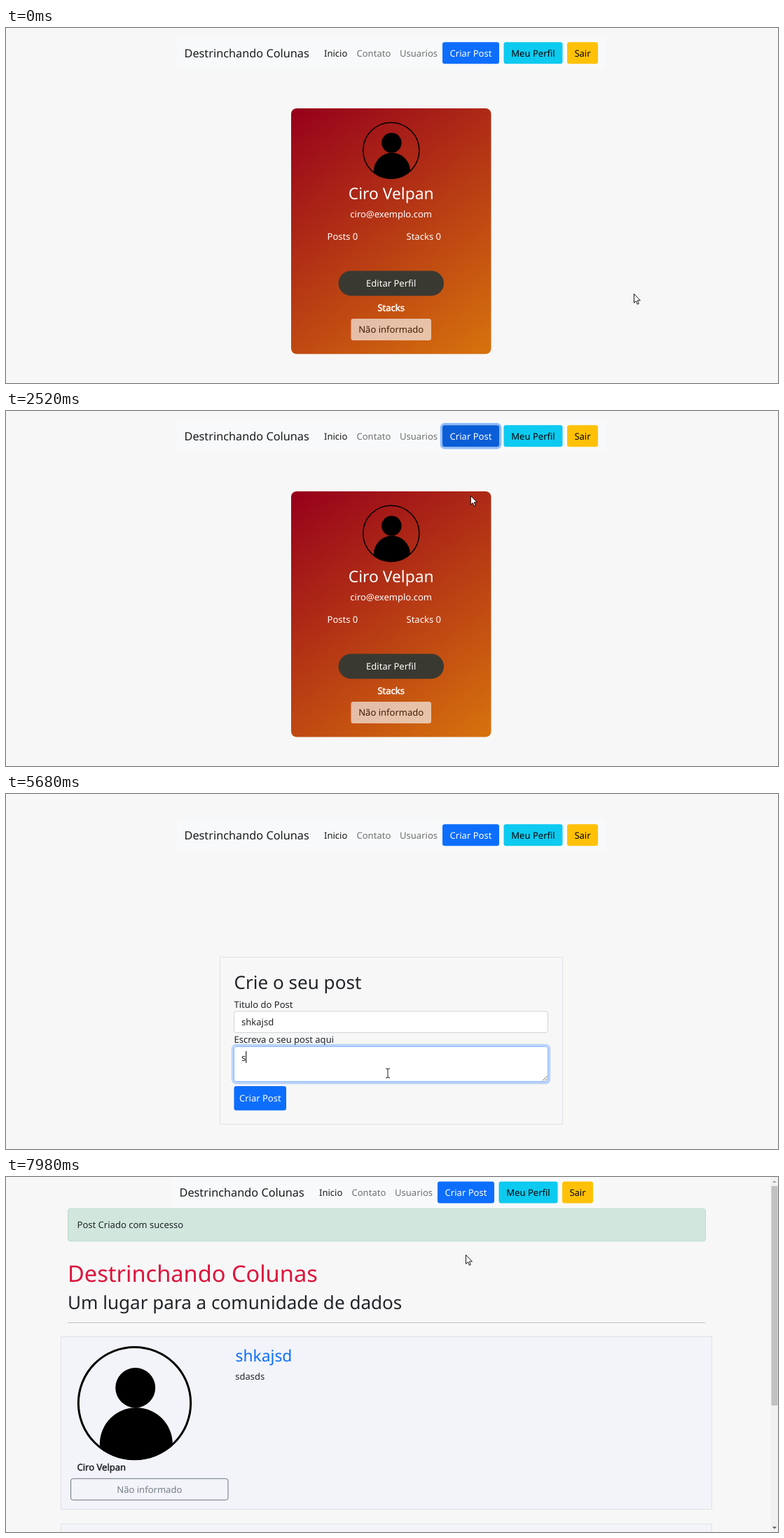
An HTML page that plays this animation: 1102 by 508 pixels, repeating every 8000 ms.

```html
<!DOCTYPE html>
<html lang="pt-BR">
<head>
<meta charset="utf-8">
<title>Blog</title>
<style>
html, body { margin: 0; width: 100%; height: 100%; overflow: hidden; background: #f7f7f7; }
svg { display: block; width: 100%; height: 100%; }
text { font-family: "Noto Sans", sans-serif; font-size: 13.04px; text-rendering: geometricPrecision; white-space: pre; }
.mid { text-anchor: middle; }
.bold { stroke: currentColor; stroke-width: .5px; }
</style>
</head>
<body>
<svg id="stage" viewBox="0 0 1102 508" xmlns="http://www.w3.org/2000/svg"></svg>
<script>
const LOOP = 8000;
const BRAND = 'Destrinchando Colunas';
const USER = 'Ciro Velpan';
const SITE = 'blogdestrinchandocolunas.herokuapp.com/';
const INK = '#212529', BLUE = '#0d6efd', CYAN = '#0dcaf0', EDGE = '#dee2e6';

// --- markup helpers ---
const text = (x, y, s, fill = INK, size = 13.04, extra = '') =>
  `<text x="${x}" y="${y}" fill="${fill}" style="font-size:${size}px" ${extra}>${s}</text>`;
const mid = (x, y, s, fill, size) => text(x, y, s, fill, size, 'class="mid"');
const bold = (x, y, s, fill, anchor = '') =>
  text(x, y, s, fill, 13.04, `class="bold ${anchor}" color="${fill}"`);
const box = (x, y, w, h, fill, r = 0, extra = '') =>
  `<rect x="${x}" y="${y}" width="${w}" height="${h}" rx="${r}" fill="${fill}" ${extra}/>`;
const line = (color) => `stroke="${color}"`;
const ring = (id, x, y, w, h, color, r = 5) =>
  box(x - 1.6, y - 1.6, w + 3.2, h + 3.2, 'none', r, `id="${id}" stroke="${color}" stroke-width="3.3"`);

const avatar = (x, y, k) => `
  <g transform="translate(${x} ${y}) scale(${k})">
    <circle r="80.2" fill="none" stroke="#000" stroke-width="3"/>
    <circle cx="1.2" cy="-22" r="28.5"/>
    <circle cx="2.3" cy="58.5" r="52" clip-path="url(#disc)"/>
  </g>`;

const nav = `
  <g id="nav">
    ${box(244, 13, 611.5, 45.5, '#f8f9fa')}
    ${text(254.5, 41.5, BRAND, '#1a1b1c', 16.3)}
    ${text(454, 40.5, 'Inicio', 'rgba(0,0,0,.9)')}
    ${text(500.5, 40.5, 'Contato', 'rgba(0,0,0,.55)')}
    ${text(562, 40.5, 'Usuarios', 'rgba(0,0,0,.55)')}
    ${ring('newRing', 623, 20.3, 81, 31, 'rgba(49,132,253,.5)')}
    ${ring('meRing', 710.5, 20.3, 84, 31, 'rgba(11,172,204,.5)')}
    ${box(623, 20.3, 81, 31, BLUE, 3.3, 'id="newBtn"')}
    ${box(710.5, 20.3, 84, 31, CYAN, 3.3, 'id="meBtn"')}
    ${box(801, 20.3, 44, 31, '#ffc107', 3.3)}
    ${mid(663.5, 40.5, 'Criar Post', '#fff')}
    ${mid(752.5, 40.5, 'Meu Perfil', '#000')}
    ${mid(823, 40.5, 'Sair', '#000')}
  </g>`;

const profile = `
  <g id="profile">
    ${box(407, 115, 285.5, 351.5, 'url(#warm)', 8)}
    ${avatar(549.8, 175.3, .5)}
    ${mid(549.7, 244.5, USER, '#fff', 22.82)}
    ${mid(549.7, 270.5, 'ciro@exemplo.com', '#fff')}
    ${text(458.5, 303.3, 'Posts 0', '#fff')}
    ${text(571.5, 303.3, 'Stacks 0', '#fff')}
    ${box(474.5, 347.5, 150.5, 35.7, '#3a3931', 17.8)}
    ${mid(549.7, 370, 'Editar Perfil', '#fff')}
    ${bold(549.7, 404.5, 'Stacks', '#fff', 'mid')}
    <g opacity=".65">
      ${box(492.5, 416, 114.5, 31, '#f8f9fa', 3.3)}
      ${mid(549.7, 436.3, 'Não informado', '#000')}
    </g>
  </g>`;

const form = `
  <g id="form">
    ${box(305.5, 233.5, 489, 239, '#f7f7f7', 0, line(EDGE))}
    ${text(325.5, 278.7, 'Crie o seu post', INK, 26.08)}
    ${text(325.5, 305.5, 'Titulo do Post')}
    ${text(325.5, 356.3, 'Escreva o seu post aqui')}
    ${ring('titleRing', 325, 310.5, 449, 31.5, 'rgba(13,110,253,.25)')}
    ${ring('bodyRing', 325, 361, 449, 51, 'rgba(13,110,253,.25)')}
    ${ring('sendRing', 325.5, 418, 74.5, 34.7, 'rgba(49,132,253,.5)')}
    ${box(325.5, 310.9, 448, 30.6, '#fff', 3.3, 'id="titleBox"')}
    ${box(325.5, 361.5, 448, 50, '#fff', 3.3, 'id="bodyBox"')}
    <path d="M766 410.3L772.5 403.8M769.6 410.3L772.5 407.4" stroke="#555" stroke-width=".9"/>
    ${box(325.5, 418, 74.5, 34.7, BLUE, 3.3, 'id="sendBtn"')}
    ${mid(362.8, 440.2, 'Criar Post', '#fff')}
    ${text(336, 331.2, '', INK, 13.04, 'id="titleText"')}
    ${text(336, 381.6, '', INK, 13.04, 'id="bodyText"')}
    ${box(0, 0, 1, 17, '#000', 0, 'id="caret"')}
  </g>`;

const feed = `
  <g id="feed">
    ${box(88.5, 45.3, 910, 46.5, '#d1e7dd', 3.3, line('#badbcc'))}
    ${text(101.5, 73.2, 'Post Criado com sucesso')}
    ${text(88, 150, BRAND, '#dc143c', 32.6)}
    ${text(88, 189, 'Um lugar para a comunidade de dados', INK, 26.08)}
    ${box(88, 208, 910.5, 1, '#c2c2c3')}
    ${box(78.5, 228.5, 929, 247, '#f2f4f9', 0, line(EDGE))}
    ${box(78.5, 496.5, 929, 40, '#f2f4f9', 0, line(EDGE))}
    ${avatar(183.5, 323.6, 1)}
    ${bold(101.5, 420, USER, INK)}
    ${box(92.5, 431.7, 224.5, 30.5, 'none', 3.3, line('#6c757d'))}
    ${mid(204.8, 451.8, 'Não informado', '#747d85')}
    ${text(327.5, 264.3, 'shkajsd', BLUE, 22.82)}
    ${text(327.3, 290, 'sdasds')}
    ${box(1091.5, 0, 10.5, 508, '#f1f1f1')}
    ${box(1092.5, 13, 9, 314, '#c1c1c1')}
    <path d="M1094 8H1100L1097 5Z" fill="#a3a3a3"/>
    <path d="M1094 500.5H1100L1097 503.5Z" fill="#505050"/>
  </g>`;

const status = `
  <g id="status">
    ${box(-4, 491.5, 241, 24, '#f9f9fa', 3.3, 'id="statusBox" stroke="#cfd0d2"')}
    ${text(-.5, 503.8, '', '#333', 9.15, 'id="statusText"')}
  </g>`;

const cursor = `
  <g id="cursor" fill="#fff" stroke="#000" stroke-width=".9" stroke-linejoin="round">
    <path id="arrow" d="M.5 .5V13.3L3.4 10.6L5.3 15.3L7.3 14.5L5.4 9.9H9.4Z"/>
    <path id="hand" d="M-1.6 11V1.3A1.6 1.6 0 0 1 1.6 1.3V6.4A1.5 1.5 0 0 1 4.4 7A1.5 1.5 0 0 1 7 7.8A1.4 1.4 0 0 1 9 9V13C9 15 8 16 7.6 18.5H.2C-.5 16-3 13.5-4.8 11.2C-5.4 9.8-3.8 8.6-2.6 9.8Z"/>
    <path id="beam" fill="none" d="M-3-6.5H-1L0-5.8L1-6.5H3M0-5.8V5.8M-3 6.5H-1L0 5.8L1 6.5H3"/>
  </g>`;

const stage = document.getElementById('stage');
stage.innerHTML = `
  <defs>
    <linearGradient id="warm" gradientUnits="userSpaceOnUse" x1="420.3" y1="105.8" x2="679.2" y2="475.2">
      <stop stop-color="#96001b"/><stop offset="1" stop-color="#d7730d"/>
    </linearGradient>
    <clipPath id="disc"><circle r="81.5"/></clipPath>
  </defs>
  ${box(0, 0, 1102, 508, '#f7f7f7')}` + nav + profile + form + feed + status + cursor;

const el = {};
stage.querySelectorAll('[id]').forEach(n => el[n.id] = n);
const show = (n, on) => n.setAttribute('visibility', on ? 'inherit' : 'hidden');
const set = (n, attrs) => { for (const k in attrs) n.setAttribute(k, attrs[k]); };

// --- timing ---
// [first change, last change, number of changes]
const bursts = [[0, 100, 2], [590, 1290, 8], [1400, 1500, 2], [1710, 1810, 2], [2010, 2730, 8],
  [2830, 3620, 9], [4040, 4040, 1], [4340, 4570, 3], [4870, 5590, 8], [5680, 6380, 8],
  [6490, 6970, 6], [7180, 7980, 9]];

// Holds the time at the latest screen change.
function held(t) {
  let last = 0;
  for (const [a, b, n] of bursts) {
    if (t < a) break;
    const gap = n > 1 ? (b - a) / (n - 1) : 1;
    last = a + Math.min(n - 1, Math.floor((t - a) / gap + 1e-6)) * gap;
  }
  return last;
}

// Pointer route: [time, x, y]
const route = [[0, 896, 380], [100, 896, 380], [590, 877, 460], [890, 812, 215], [1190, 757, 3],
  [1290, 749, 28], [1500, 746, 34], [1710, 700, 37], [1810, 685.5, 37], [2110, 685.5, 37],
  [2530, 655, 150], [2730, 650, 175], [2830, 650, 175], [3125, 570, 262], [3420, 486.5, 327],
  [4870, 486.5, 327], [5075, 545, 196], [5180, 556, 230], [5480, 545, 399.5], [5980, 545, 399.5],
  [6280, 372, 435], [6490, 372, 435], [6778, 594, 114], [6970, 604, 118], [7180, 570, 150],
  [7480, 236, 418], [7680, 340, 270], [7880, 515, 76], [7980, 656, 111], [8000, 656, 111]];

function pointerAt(t) {
  const i = Math.max(1, route.findIndex(p => p[0] >= t));
  const [a, x, y] = route[i - 1], [b, u, v] = route[i];
  const k = (t - a) / (b - a);
  return [x + (u - x) * k, y + (v - y) * k];
}

const inside = ([x, y], l, t, r, b) => x >= l && x <= r && y >= t && y <= b;

function typed(t, word, steps) {
  let n = 0;
  for (const [at, count] of steps) if (t >= at - 1) n = count;
  return word.slice(0, n);
}

function draw(now) {
  const t = held(now);
  const p = pointerAt(t);
  const page = t < 2830 ? 'profile' : t < 6870 ? 'form' : 'feed';
  for (const g of ['profile', 'form', 'feed']) show(el[g], g === page);
  el.nav.setAttribute('transform', { profile: 'translate(0 0)', form: 'translate(0 23)', feed: 'translate(-7 -13.8)' }[page]);

  // navigation bar
  const onProfile = page === 'profile';
  const onNew = onProfile && inside(p, 623, 20, 704, 51);
  const onMe = onProfile && inside(p, 710, 20, 795, 51);
  const newFocus = onProfile && t >= 2010, meFocus = t >= 1400 && t < 2010;
  el.newBtn.setAttribute('fill', newFocus ? '#0b5ed7' : onNew ? '#0c66ee' : BLUE);
  el.meBtn.setAttribute('fill', onMe || meFocus ? '#31d2f2' : CYAN);
  show(el.newRing, newFocus);
  show(el.meRing, meFocus);

  // link address
  show(el.status, t >= 1400 && t < 2400);
  const link = SITE + (t < 1710 ? 'perfil' : 'post/criar');
  if (el.statusText.textContent !== link) el.statusText.textContent = link;
  el.statusBox.setAttribute('width', el.statusText.getComputedTextLength() + 9.8);

  // form
  const focus = page !== 'form' || t < 3500 ? '' : t < 5480 ? 'title' : t < 6370 ? 'body' : 'send';
  for (const f of ['title', 'body', 'send']) show(el[f + 'Ring'], focus === f);
  for (const f of ['title', 'body']) el[f + 'Box'].setAttribute('stroke', focus === f ? '#86b7fe' : '#ced4da');
  const onSend = page === 'form' && inside(p, 325, 418, 400, 453);
  el.sendBtn.setAttribute('fill', focus === 'send' || onSend ? '#0b5ed7' : BLUE);
  el.titleText.textContent = typed(t, 'shkajsd', [[4340, 2], [4455, 5], [4570, 7]]);
  el.bodyText.textContent = typed(t, 'sdasds', [[5680, 1], [5780, 3], [5880, 5], [5980, 6]]);
  const field = focus === 'title' ? el.titleText : el.bodyText;
  const blink = t >= 4040 && t < 4340;
  show(el.caret, (focus === 'title' || focus === 'body') && !blink);
  set(el.caret, { x: 336 + field.getComputedTextLength(), y: focus === 'title' ? 317.5 : 368 });

  // pointer
  const onField = page === 'form' && (inside(p, 325, 311, 774, 342) || inside(p, 325, 361, 774, 412));
  const kind = onField ? 'beam' : onNew || onMe || onSend ? 'hand' : 'arrow';
  for (const k of ['arrow', 'hand', 'beam']) show(el[k], k === kind);
  show(el.cursor, t < 100 || t >= 590);
  el.cursor.setAttribute('transform', `translate(${p[0].toFixed(2)} ${p[1].toFixed(2)})`);
}

const start = performance.now();
function tick() {
  draw((performance.now() - start) % LOOP);
  requestAnimationFrame(tick);
}
tick();
</script>
</body>
</html>
```
